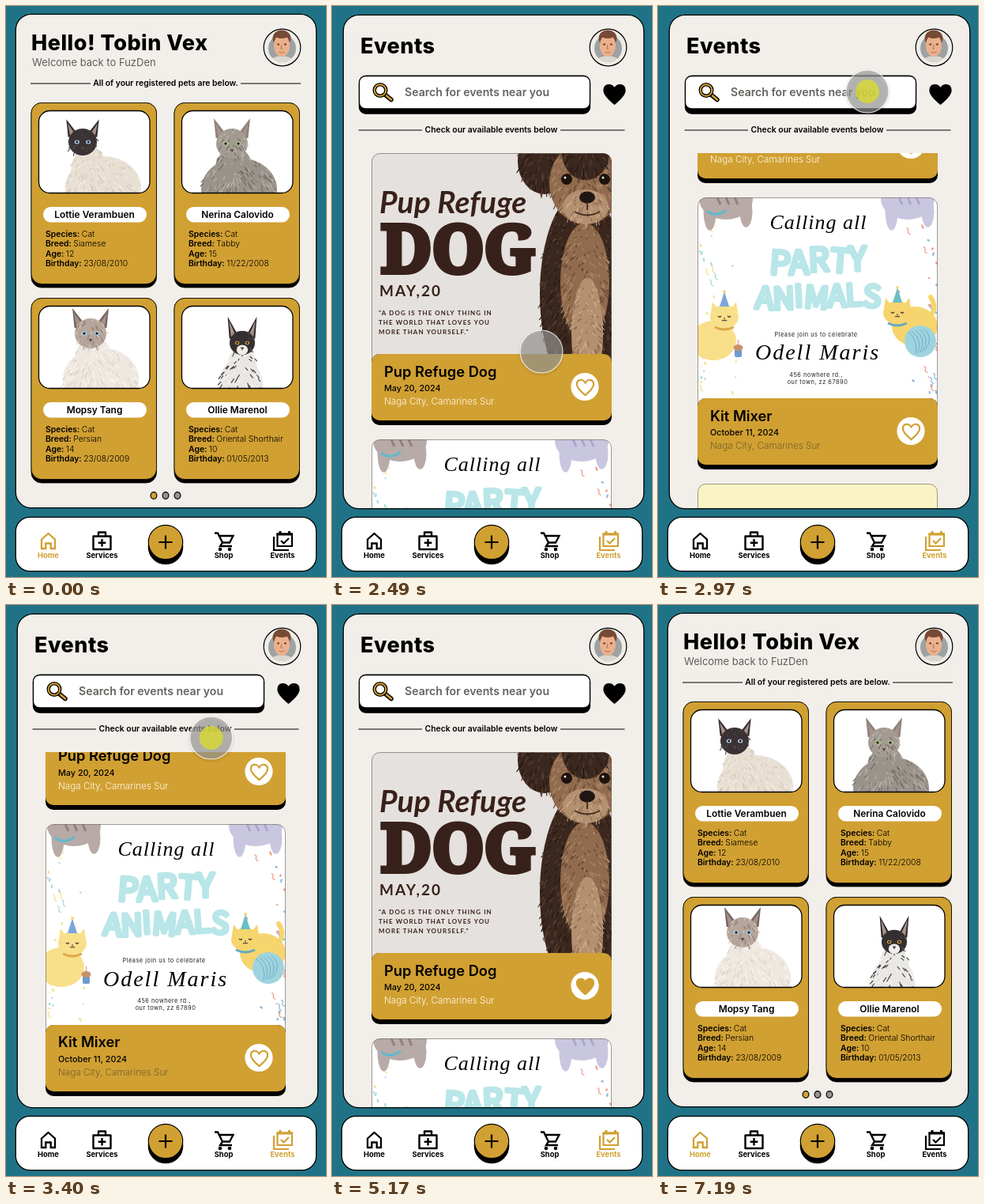
An HTML page with a canvas that plays this animation: 405x722 px, repeating every 8.07 s.

```html
<!DOCTYPE html>
<html lang="en">
<head>
<meta charset="utf-8">
<title>Pet app</title>
<style>
html, body { margin: 0; width: 100%; height: 100%; overflow: hidden; background: #207386; }
canvas { display: block; width: 405px; height: 722px; }
</style>
</head>
<body>
<canvas id="stage"></canvas>
<script>
const W = 405, H = 722, LOOP = 8070, TAU = Math.PI * 2;
const GOLD = '#d1a032', INK = '#000', PAPER = '#f2efea', BROWN = '#38211a';
const SANS = 'Inter, "Open Sans", sans-serif';
const LATO = 'Lato, sans-serif';
const SERIF = '"Noto Serif", serif';
const SCRIPT = '"Liberation Serif", serif';
const ROUND = '"Noto Sans CJK JP", "Noto Sans CJK", sans-serif';

const canvas = document.getElementById('stage');
const ctx = canvas.getContext('2d');
const dpr = window.devicePixelRatio || 1;
canvas.width = W * dpr;
canvas.height = H * dpr;

const clamp = (v, a = 0, b = 1) => Math.min(b, Math.max(a, v));
const mix = (a, b, p) => a + (b - a) * p;

function random(seed) {
  return () => (seed = (seed * 16807) % 2147483647) / 2147483647;
}

// ---- drawing helpers ----
function text(s, x, y, size, weight, color, o = {}) {
  ctx.font = `${o.style || ''} ${weight} ${size}px ${o.font || SANS}`;
  ctx.letterSpacing = (o.space || 0) + 'px';
  ctx.textAlign = o.align || 'left';
  ctx.fillStyle = ctx.strokeStyle = color;
  ctx.fillText(s, x, y);
  if (o.fat) {
    ctx.lineWidth = o.fat;
    ctx.lineJoin = o.join || 'round';
    ctx.strokeText(s, x, y);
  }
  ctx.letterSpacing = '0px';
}

function paint(fill, stroke, width) {
  if (fill) { ctx.fillStyle = fill; ctx.fill(); }
  if (stroke) { ctx.strokeStyle = stroke; ctx.lineWidth = width; ctx.stroke(); }
}

function box(x, y, w, h, r, fill, stroke, width = 1.3) {
  ctx.beginPath();
  ctx.roundRect(x, y, w, h, r);
  paint(fill, stroke, width);
}

function raised(x, y, w, h, r, fill, drop, width = 1.3) {
  box(x, y, w, h + drop, r, INK, INK, width);
  box(x, y, w, h, r, fill, INK, width);
}

function oval(x, y, rx, ry, fill, stroke, width = 1) {
  ctx.beginPath();
  ctx.ellipse(x, y, rx, ry, 0, 0, TAU);
  paint(fill, stroke, width);
}
const disc = (x, y, r, fill, stroke, width) => oval(x, y, r, r, fill, stroke, width);

// Triangle leaning from its base centre towards a tip
function spike(x, y, half, dx, dy, fill) {
  ctx.beginPath();
  ctx.moveTo(x - half, y);
  ctx.lineTo(x + dx, y + dy);
  ctx.lineTo(x + half, y);
  paint(fill);
}

function line(d, color, width = 1, cap = 'butt', join = 'miter') {
  ctx.strokeStyle = color;
  ctx.lineWidth = width;
  ctx.lineCap = cap;
  ctx.lineJoin = join;
  ctx.stroke(new Path2D(d));
}

function heart(x, y, s, fill, stroke) {
  ctx.beginPath();
  ctx.moveTo(x, y + s * .9);
  for (const side of [-1, 1]) {
    ctx.moveTo(x, y + s * .9);
    ctx.bezierCurveTo(x + side * s * .6, y + s * .4, x + side * s, y, x + side * s, y - s * .38);
    ctx.bezierCurveTo(x + side * s, y - s * 1.05, x + side * s * .28, y - s * 1.08, x, y - s * .55);
  }
  ctx.lineCap = 'round';
  paint(fill, stroke, 2.2);
}

function clipped(x, y, w, h, r, draw) {
  ctx.save();
  ctx.beginPath();
  ctx.roundRect(x, y, w, h, r);
  ctx.clip();
  draw();
  ctx.restore();
}

// Oval of fur: base tone, then hairs of the other tones combed outwards and down
function fur(x, y, rx, ry, [base, ...tones]) {
  const rnd = random(Math.round(x * 31 + y * 7 + rx));
  oval(x, y, rx, ry, base);
  ctx.lineWidth = 1.1;
  ctx.lineCap = 'round';
  tones.forEach(tone => {
    ctx.beginPath();
    for (let i = 0; i < rx * ry / 22; i++) {
      const a = rnd() * TAU, d = Math.sqrt(rnd());
      const px = x + Math.cos(a) * d * rx, py = y + Math.sin(a) * d * ry;
      ctx.moveTo(px, py);
      ctx.lineTo(px + Math.cos(a) * 3 + rnd() * 2 - 1, py + Math.sin(a) * 2 + 4);
    }
    paint(null, tone, 1.1);
  });
}

// ---- shared parts ----
function avatar() {
  disc(349.5, 52.5, 23.3, '#efece7', INK, 1.2);
  disc(349.5, 53.5, 17.5, '#9da2a3');
  clipped(332, 29, 35, 42, [0, 0, 17, 17], () => {
    oval(349, 72, 16, 9, '#dad6d0');
    oval(349, 41, 11.5, 10.5, '#764a35');
    oval(349, 50, 10, 14, '#ebb08c');
    oval(349, 36.5, 9, 4.5, '#764a35');
    for (const side of [-1, 1]) oval(349 + side * 4.4, 48.5, 1.6, 1, '#4d3227');
    line('M349 49l-1 5h2M345.5 58q3.5 2 7 0', '#bd7354', 1.1);
  });
}

function divider(y, x0, x1, x2, x3, label) {
  line(`M${x0} ${y}H${x1}M${x2} ${y}H${x3}`, INK, 1.1);
  text(label, (x1 + x2) / 2, y + 3.4, 10.4, 600, INK, { align: 'center' });
}

function nav(onEvents) {
  box(12.3, 646.3, 380.4, 68.4, 18, '#fff', INK);
  const home = onEvents ? INK : GOLD, events = onEvents ? GOLD : INK;
  line('M45 674.5L53.5 667L62 674.5V686H56.7V679.5H50.3V686H45Z', home, 2.3);
  line('M110.5 670.5H132.5V687H110.5ZM117 670V665.5H126V670M121.5 674V683.5M116.7 678.7H126.3', INK, 2.4, 'butt', 'round');
  line('M264 666.5H268L274 678.5H283L287.5 670H270M274 678.5L271 683H286', INK, 2.3);
  for (const x of [271, 283]) disc(x, 687, 2.3, INK);
  line('M343.5 667.5H362V683H343.5ZM339 671V688H358M348 676L351.5 679.5L358 673', events, 2.2);
  line('M342.5 668H363M347 664V668M358.5 664V668', events, 3);

  const labels = [['Home', 53.5, home], ['Services', 121.5, INK], ['Shop', 275.5, INK], ['Events', 350, events]];
  for (const [s, x, color] of labels) text(s, x, 698, 9.4, 700, color, { align: 'center' });

  disc(202, 684, 21.7, INK, INK, 1.2);
  disc(202, 678, 21.7, GOLD, INK, 1.2);
  line('M202 669.5V686.5M193.5 678H210.5', INK, 2.2);
}

// ---- home page ----
const pets = [
  { name: 'Lottie Verambuen', breed: 'Siamese', age: 12, born: '23/08/2010',
    head: [97, 172], size: 18, lean: 26, coat: ['#e8dfd3', '#f3ede5', '#d5c7b6'], face: ['#3a3234', '#4d4344'], ear: '#342d30', eye: '#b5d1e4' },
  { name: 'Nerina Calovido', breed: 'Tabby', age: 15, born: '11/22/2008',
    head: [286, 174], size: 20, lean: 9, coat: ['#9a938b', '#6d665f', '#bab3aa'], face: ['#a39b92', '#756e67', '#c4bdb4'], ear: '#8a827b', eye: '#aebb86' },
  { name: 'Mopsy Tang', breed: 'Persian', age: 14, born: '23/08/2009',
    head: [107, 414], size: 20, lean: 13, coat: ['#eee8e0', '#faf7f3', '#ddd2c7'], face: ['#b5a59a', '#8e7d75', '#d8ccc1'], ear: '#756862', eye: '#a5c6e0' },
  { name: 'Ollie Marenol', breed: 'Oriental Shorthair', age: 10, born: '01/05/2013',
    head: [299, 426], size: 16, lean: -2, slim: .6, coat: ['#e9e7e4', '#f7f6f4', '#3a3637'], face: ['#343031', '#4a4546'], ear: '#2b2829', eye: '#cf9c45', chin: '#efedea' },
];

function cat({ head: [x, y], size: s, lean, slim = 1, coat, face, ear, eye, chin }) {
  fur(x + lean, y + 58, 48 * slim, 40, coat);
  fur(x + lean * .3, y + 38, s * 1.25, 34, coat);
  const tall = 1.6 / Math.sqrt(slim);
  for (const side of [-1, 1]) {
    spike(x + side * s * .6, y - s * .35, s * .42, side * s * .55, -s * tall + s * .35, ear);
    spike(x + side * s * .65, y - s * .4, s * .22, side * s * .4, -s * tall + s * .7, '#a89088');
  }
  fur(x, y, s, s * .95, face);
  if (chin) oval(x, y + s * .55, s * .45, s * .4, chin);
  for (const side of [-1, 1]) {
    oval(x + side * s * .4, y, s * .17, s * .14, eye);
    disc(x + side * s * .4, y, s * .08, '#15171b');
  }
  spike(x, y + s * .35, 2.5, 0, 4, '#5c4848');
}

function petCard(pet, i) {
  const x = 32 + (i % 2) * 181, y = 122.5 + (i >> 1) * 247;
  raised(x, y, 158.5, 229, 13, GOLD, 4.5, .8);
  box(x + 9.5, y + 10, 140.5, 104, 14, '#fff');
  clipped(x + 9.5, y + 10, 140.5, 104, 14, () => cat(pet));
  box(x + 9.5, y + 10, 140.5, 104, 14, null, INK);
  box(x + 15, y + 131.5, 131, 19.5, 9.7, '#fff');
  text(pet.name, x + 80, y + 145.6, 11.9, 600, INK, { align: 'center' });
  const rows = [['Species:', 'Cat'], ['Breed:', pet.breed], ['Age:', pet.age], ['Birthday:', pet.born]];
  rows.forEach(([key, value], k) => {
    const base = y + 169 + k * 12.6;
    text(key, x + 18, base, 10.4, 600, INK);
    text(value, x + 20.5 + ctx.measureText(key).width, base, 10.4, 300, INK);
  });
}

function homePage() {
  box(12.3, 10.3, 380.4, 624.4, 20, PAPER, INK);
  text('Hello! Tobin Vex', 32, 56, 27, 800, INK, { space: .5 });
  text('Welcome back to FuzDen', 33, 75.5, 13, 400, '#5f5d5a');
  avatar();
  divider(98, 31, 107, 297, 373, 'All of your registered pets are below.');
  pets.forEach(petCard);
  for (let i = 0; i < 3; i++) oval(187 + i * 15, 619, 3.9, 4.3, i ? '#939393' : GOLD, INK, 1.2);
}

// ---- posters, drawn from the top of their card ----
function dog(x, y) {
  const dark = ['#3a271e', '#24170f', '#5b4030'], tan = ['#916b4e', '#5f4330', '#b58d6b'];
  const pale = ['#b39070', '#d0b190', '#8d6a4e'];
  fur(x - 4, y + 140, 54, 130, dark);
  fur(x - 1, y + 125, 31, 75, tan);
  fur(x + 2, y + 190, 20, 70, pale);
  for (const side of [-1, 1]) fur(x + side * 52, y - 28, 34, 42, dark);
  fur(x, y, 46, 52, tan);
  fur(x, y - 38, 30, 34, dark);
  fur(x, y + 30, 29, 22, pale);
  for (const side of [-1, 1]) {
    disc(x + side * 24, y - 5, 7, '#1d120d');
    disc(x + side * 24 - 2, y - 7, 1.5, '#e8e2dc');
  }
  oval(x + 2, y + 18, 10, 7.5, '#1f1613');
  line(`M${x + 2} ${y + 24}v10M${x - 14} ${y + 36}q16 9 32 0`, '#3f2a1f', 1.8);
}

function dogPoster() {
  ctx.fillStyle = '#e5e1de';
  ctx.fillRect(50, 0, 304, 270);
  dog(321, 38);
  text('Pup Refuge', 60, 76, 39, 700, BROWN, { font: LATO, style: 'italic' });
  text('DOG', 62, 151, 84, 900, BROWN, { font: SERIF, fat: 6, join: 'miter' });
  text('MAY,20', 60, 181, 19, 700, BROWN, { font: LATO, space: 2 });
  ['"A DOG IS THE ONLY THING IN', 'THE WORLD THAT LOVES YOU', 'MORE THAN YOURSELF."'].forEach((s, i) =>
    text(s, 59, 204.5 + i * 12.3, 7.9, 700, BROWN, { font: LATO, space: 1.1 }));
}

function confetti() {
  const rnd = random(41), colors = ['#8bb9df', '#f5e18f', '#ef9c8c', '#a9dbe0'];
  for (let i = 0; i < 64; i++) {
    const deep = rnd() * rnd() * 60, x = i % 2 ? 52 + deep : 352 - deep, y = 26 + rnd() * 224;
    if (i % 3) line(`M${x} ${y}l${rnd() * 5 - 2} ${rnd() * 4 + 1}`, colors[i % 4], 2.2);
    else line(`M${x} ${y}q3 1 2 4t3 4`, colors[i % 4], 1.3);
  }
}

// Cat hanging from the top edge, legs down
function hangingCat(x, dir, coat, shade) {
  oval(x, 2, 34, 26, coat);
  for (const k of [-.6, .75]) oval(x + dir * k * 34, 18, 8, 22 - k * 3, coat);
  for (let k = -1; k <= 1; k++) line(`M${x + k * 11} 0l${dir * 4} 9`, shade, 3);
}

function partyCat(x, y, bodyX, bodyY, coat, hat, collar) {
  oval(bodyX, bodyY, 29, 25, coat);
  for (const side of [-1, 1]) spike(x + side * 11, y - 6, 6, side * 4, -13, coat);
  oval(x, y, 18, 15, coat);
  spike(x, y - 13, 6, 0, -19, hat);
  disc(x, y - 32, 2, '#f3d87b');
  for (const side of [-1, 1]) line(`M${x + side * 6 - 2} ${y - 1}q2 2.5 4 0`, '#4b3d38', 1.3);
  line(`M${x - 3} ${y + 4}q1.5 2 3 0q1.5 2 3 0M${x} ${y + 1}v2`, '#4b3d38', 1.1);
  line(`M${x - 12} ${y + 13}q12 6 24 0`, collar, 3);
}

// Letters that rock to and fro around their baseline
function wobbly(s, x, y, size, slope) {
  ctx.font = `400 ${size}px ${ROUND}`;
  const widths = [...s].map(c => ctx.measureText(c).width);
  let left = -widths.reduce((a, b) => a + b) / 2;
  [...s].forEach((c, i) => {
    const mid = left + widths[i] / 2;
    ctx.save();
    ctx.translate(x + mid, y + mid * slope + Math.sin(i * 2.4) * 1.5);
    ctx.rotate(Math.cos(i * 2) * .08);
    text(c, 0, 0, size, 400, '#b9e6e8', { font: ROUND, align: 'center', fat: 5 });
    ctx.restore();
    left += widths[i];
  });
}

function partyPoster() {
  ctx.fillStyle = '#fff';
  ctx.fillRect(50, 0, 304, 270);
  confetti();
  hangingCat(86, 1, '#b8aaa6', '#8f807e');
  line('M62 17q11 9 25 -1', '#61b9cd', 3);
  hangingCat(316, 1, '#c9c6df', '#aaa7cd');
  partyCat(84, 151, 70, 181, '#f8df8a', '#7da6da', '#dba847');
  box(97, 192, 9, 10, 2, '#6f9bcf');
  oval(101.5, 190, 6, 4, '#c8916b');
  line('M101.5 186v-6', '#ef9c8c', 1.5);
  line('M344 152q10 -13 1 -26', '#f6d56e', 6, 'round');
  partyCat(303, 146, 325, 163, '#f6d56e', '#69bfc5', '#63abc0');
  disc(332, 182, 20, '#9fd3df');
  for (let i = 0; i < 5; i++) line(`M${316 + i * 5} ${170 - i}q14 10 ${10 - i * 2} 28`, '#6fb2c5', 1);

  const script = { font: SCRIPT, style: 'italic', align: 'center' };
  const small = { align: 'center', space: .5 };
  text('Calling all', 203, 40, 26, 400, INK, { ...script, space: 1 });
  wobbly('PARTY', 202, 95, 41, -.05);
  wobbly('ANIMALS', 202, 139, 38, -.03);
  text('Please join us to celebrate', 200, 175.5, 7.4, 400, '#222', small);
  text('Odell Maris', 202, 205, 28, 400, INK, { ...script, space: 2 });
  text('456 nowhere rd.,', 200, 226.5, 7.4, 400, '#222', small);
  text('our town, zz 67890', 202, 235.5, 7.4, 400, '#222', small);
}

function plainPoster() {
  ctx.fillStyle = '#fbf3c6';
  ctx.fillRect(50, 0, 304, 270);
}

// ---- events page ----
const events = [
  { title: 'Pup Refuge Dog', date: 'May 20, 2024', tone: '#fff8e6', poster: dogPoster },
  { title: 'Kit Mixer', date: 'October 11, 2024', tone: '#75612f', poster: partyPoster },
  { poster: plainPoster },
];

function eventCard(e, y, liked) {
  if (y > 635) return;
  ctx.save();
  ctx.translate(0, y);
  clipped(50.5, .5, 303, 275, 10, e.poster);
  box(50.5, .5, 303, 290, 10, null, 'rgba(60,50,40,.6)', .8);
  box(50, 254, 304, 90, 10, INK);
  box(50, 254, 304, 84, 10, GOLD);
  if (e.title) {
    text(e.title, 66, 282.5, 18.3, 600, INK);
    text(e.date, 66, 300.7, 10.8, 500, INK);
    text('Naga City, Camarines Sur', 66, 318, 11.7, 300, e.tone);
  }
  disc(320, 295.5, 17.6, '#fff');
  heart(320.5, 296.5, 10.6, liked ? GOLD : null, GOLD);
  ctx.restore();
}

function eventsPage(scroll, liked) {
  box(14.3, 11.3, 380.4, 624.4, 20, PAPER, INK);
  text('Events', 36, 60, 27, 800, INK, { space: .5 });
  avatar();
  raised(34.5, 88.5, 292, 41.5, 8, '#fff', 6);
  line('M67 112L75 118.5', INK, 5.5, 'round');
  line('M69 113.5L75 118.5', GOLD, 2.6, 'round');
  disc(61, 106.5, 7.3, '#fff', INK, 4.4);
  disc(61, 106.5, 7.3, null, GOLD, 2);
  text('Search for events near you', 92, 114, 14.1, 600, '#65625f');
  heart(357.5, 112, 13, INK, INK);
  divider(157, 33.5, 114, 289, 370.5, 'Check our available events below');
  clipped(49, 186, 306, 449, 0, () => {
    events.forEach((e, i) => eventCard(e, 186 + i * 362 - scroll, liked && i === 0));
  });
}

// ---- motion ----
const bezier = (s, a, b) => 3 * (1 - s) * (1 - s) * s * a + 3 * (1 - s) * s * s * b + s * s * s;
function glide(t) {
  let lo = 0, hi = 1;
  for (let i = 0; i < 20; i++) {
    const m = (lo + hi) / 2;
    if (bezier(m, .33, .33) < t) lo = m; else hi = m;
  }
  return bezier(lo, .23, 1);
}
const dash = t => t * t;

// Each stop: time span, place, easing; a stop without easing is where the touch enters
const GRAB = 437, TOP = 84;
const path = [
  { start: 770, at: [-30, 666] },
  { start: 770, end: 1540, at: [345, 681], ease: glide },
  { start: 1960, end: 2480, at: [265, GRAB], ease: glide },
  { start: 2630, end: 3120, at: [265, TOP], ease: glide },
  { start: 3260, end: 4090, at: [238, 508], ease: glide },
  { start: 4090, end: 4590, at: [326, 480], ease: glide },
  { start: 5090, end: 5170, at: [436, 483], ease: dash },
  { start: 6150, at: [-30, 675] },
  { start: 6150, end: 6510, at: [52, 681], ease: glide },
  { start: 6910, end: 7190, at: [435, 686], ease: dash },
];
const presses = [[1590, 1800], [2520, 4030], [4740, 4905], [6640, 6850]];

function touchAt(t) {
  const i = path.findLastIndex(stop => t >= stop.start);
  if (i < 0) return null;
  const { start, end, at, ease } = path[i];
  if (ease === dash && t >= end) return null;
  const p = ease(clamp((t - start) / (end - start)));
  const [x, y] = path[i - 1].at.map((from, k) => mix(from, at[k], p));
  const press = Math.max(...presses.map(([a, b]) => Math.min(clamp((t - a) / 50), clamp(1 - (t - b) / 30))));
  return { x, y, press };
}

// The list follows the drag after a little slack, both ways
function scrollAt(t, touch) {
  const slack = 23, most = GRAB - TOP - slack;
  if (t < 2630 || t >= 4090) return 0;
  if (t < 3200) return Math.max(0, GRAB - slack - touch.y);
  return clamp(most + slack + TOP + 2 - touch.y, 0, most);
}

function drawTouch({ x, y, press }) {
  ctx.save();
  ctx.shadowColor = 'rgba(0,0,0,.3)';
  ctx.shadowBlur = 4 * dpr;
  ctx.shadowOffsetY = 1.5 * dpr;
  disc(x, y, 27, 'rgba(160,160,158,.62)');
  ctx.restore();
  disc(x, y, 27, null, 'rgba(255,255,255,.85)', 1.1);
  if (press > 0) disc(x, y, 15 * press, 'rgba(220,222,40,.75)');
}

function render(t) {
  ctx.setTransform(dpr, 0, 0, dpr, 0, 0);
  ctx.fillStyle = '#207386';
  ctx.fillRect(0, 0, W, H);
  const touch = touchAt(t);
  const onEvents = t >= 1800 && t < 6850;
  if (onEvents) eventsPage(scrollAt(t, touch), t >= 4910);
  else homePage();
  nav(onEvents);
  if (touch) drawTouch(touch);
}

function tick() {
  render(performance.now() % LOOP);
  requestAnimationFrame(tick);
}
tick();
</script>
</body>
</html>
```
